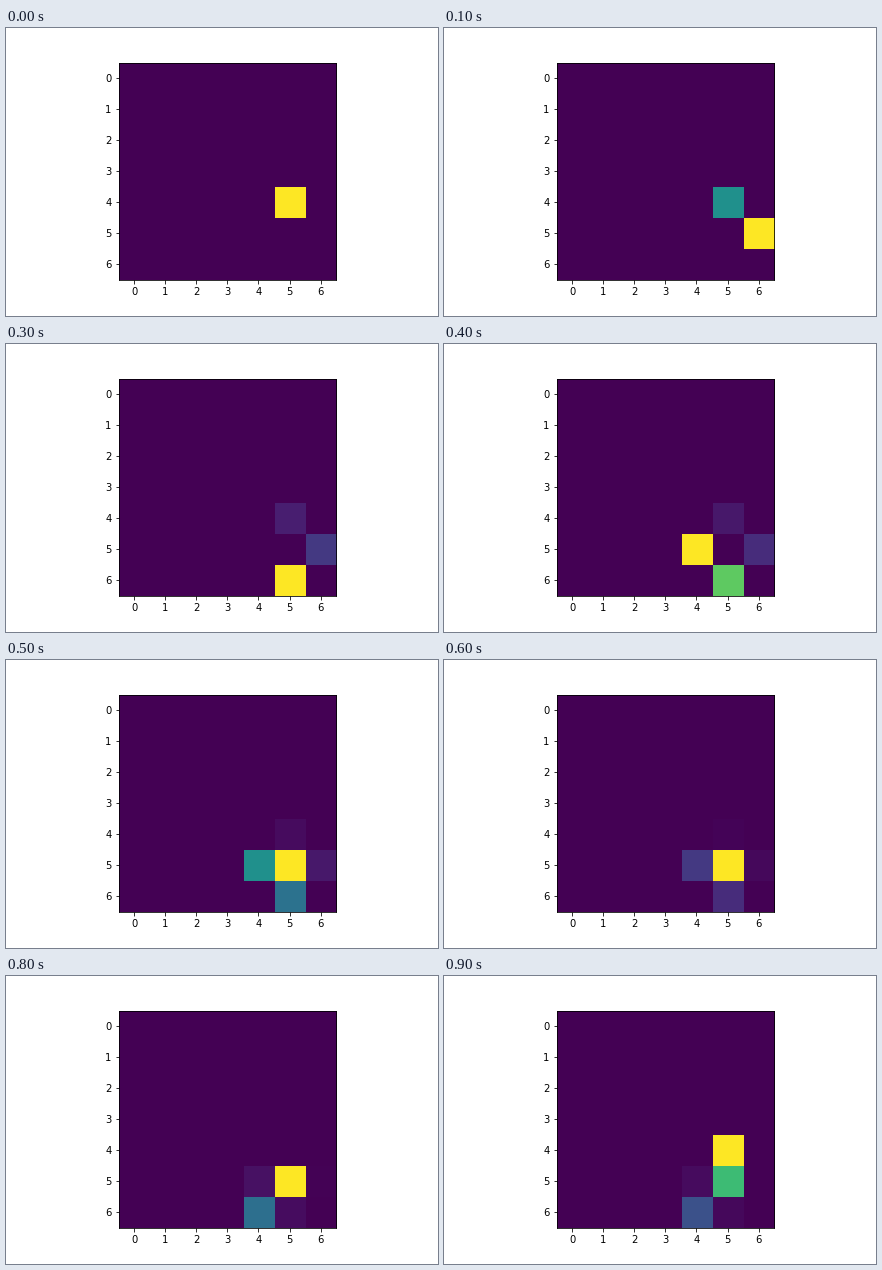
A matplotlib script for the animation above (1000 ms loop, 432 px wide and 288 px high).

```python
import math

import matplotlib.pyplot as plt
import numpy as np
from matplotlib.animation import FuncAnimation

SIZE = 7
STEPS = 10
DECAY = 0.5


def walker(step):
    """Cell (row, column): two vertical bobs with a sidestep every third step."""
    angle = 2 * math.pi * (step + 0.5) / STEPS
    row = round(5.1 - 0.5 * math.cos(angle) - 0.84 * math.cos(2 * angle - 0.3))
    side = 1 if step < 3 else -1  # first to the right, then to the left
    column = 5 + side * (step % 3 == 1)
    return row, column


def trail(step):
    """Sum of all visits so far, each halved once per elapsed step."""
    grid = np.zeros((SIZE, SIZE))
    for past in range(step + 1):
        grid *= DECAY
        grid[walker(past)] += 1
    return grid


plt.rcParams.update({"font.family": "DejaVu Sans", "font.size": 10})
fig = plt.figure(figsize=(6, 4), dpi=72, facecolor="white")
fig.subplots_adjust(left=0.125, right=0.9, bottom=0.125, top=0.88)
ax = fig.add_subplot()
image = ax.imshow(trail(0), cmap="viridis")
ax.set_xticks(range(SIZE))
ax.set_yticks(range(SIZE))


def update(step):
    grid = trail(step)
    image.set_data(grid)
    image.set_clim(0, grid.max())
    return [image]


anim = FuncAnimation(fig, update, frames=STEPS, interval=100,
                     repeat=True, repeat_delay=0)
plt.show()
```
